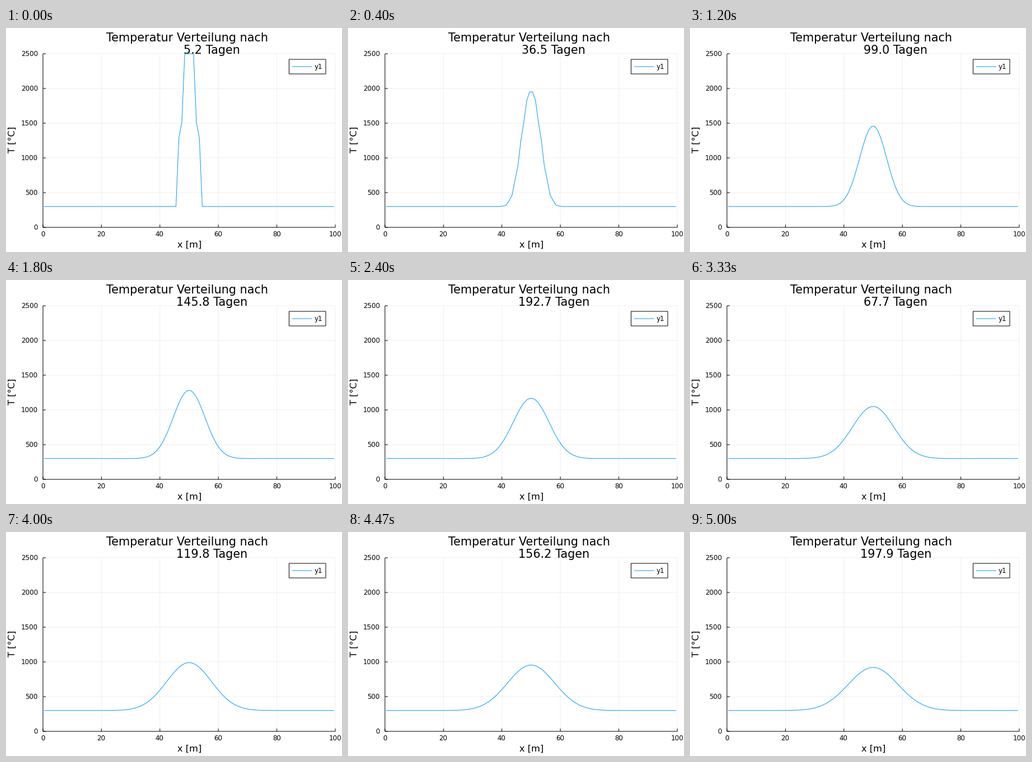
Recreate the animation shown at these times as a matplotlib script. Size 600 by 400 pixels, loop 5.07 s.

```python
import numpy as np
import matplotlib.pyplot as plt
from matplotlib.animation import FuncAnimation
from matplotlib.patches import Rectangle

W, H, DPI = 600, 400, 100
LEFT, RIGHT, TOP, BOTTOM = 66, 588, 46, 356
PX = 72 / DPI                # one pixel in points
EM = 1.4815 * PX             # text scale
BLUE = "#009afa"
TITLE, GUIDE, SMALL = 14, 11, 8

STEPS, FPS = 76, 15          # simulation steps shown, steps per second
LOOP_MS, TICK_MS = 5070, 30  # the tick divides the loop exactly
RUN = 38                     # the day counter restarts after one run
DT = 450_000                 # seconds per step
ALPHA = 1e-6                 # thermal diffusivity, m^2/s
DX = 1.0

plt.rcParams["font.family"] = "DejaVu Sans"
plt.rcParams["path.snap"] = False


def simulate(steps):
    """Explicit heat diffusion of a hot layer in a 100 m column."""
    x = np.arange(0.5, 100, DX)
    temp = np.where(abs(x - 50) < 3, 2500.0, 300.0)
    r = ALPHA * DT / DX**2
    states = []
    for _ in range(steps):
        temp = temp.copy()
        temp[1:-1] += r * np.diff(temp, 2)
        states.append(temp)
    return x, states


x, states = simulate(STEPS)

fig = plt.figure(figsize=(W / DPI, H / DPI), dpi=DPI, facecolor="white")

# Pixel canvas for everything but the curve
stage = fig.add_axes([0, 0, 1, 1])
stage.set(xlim=(0, W), ylim=(H, 0))
stage.axis("off")


def label(px, py, text, size, ha="center", **kw):
    return stage.text(px, py, text, fontsize=size * EM, ha=ha,
                      va="baseline", color="black", **kw)


def to_px(v, top_value, start, end):
    return start + v / top_value * (end - start)


grid = dict(color="black", alpha=0.06, lw=PX)
axis = dict(color="black", lw=PX)

for v in range(0, 101, 20):
    px = to_px(v, 100, LEFT, RIGHT)
    stage.vlines(px, TOP, BOTTOM, **grid)
    stage.vlines(px, BOTTOM - 5, BOTTOM, **axis)
    label(px - 0.4, 372, str(v), SMALL)
for v in range(0, 2501, 500):
    py = to_px(v, 2500, BOTTOM, TOP)
    stage.hlines(py, LEFT, RIGHT, **grid)
    stage.hlines(py, LEFT, LEFT + 5, **axis)
    label(56.8, py + 4.2, str(v), SMALL, ha="right")
stage.vlines(LEFT, TOP, BOTTOM, **axis)
stage.hlines(BOTTOM, LEFT, RIGHT, **axis)

label(327.5, 392, "x [m]", GUIDE)
label(16, 199.5, "T [°C]", GUIDE, rotation=90, rotation_mode="anchor")
label(323.2, 24, "Temperatur Verteilung nach", TITLE)
days = label(367.3, 46, "", TITLE)

stage.add_patch(Rectangle((505.5, 56), 65.5, 26, fc="white", ec="black",
                          lw=PX))
stage.hlines(69, 511, 546.5, color=BLUE, lw=PX)
label(551, 73.5, "y1", SMALL, ha="left")

ax = fig.add_axes([LEFT / W, 1 - BOTTOM / H,
                   (RIGHT - LEFT) / W, (BOTTOM - TOP) / H])
ax.set(xlim=(0, 100), ylim=(0, 2500))
ax.axis("off")
curve, = ax.plot([], [], color=BLUE, lw=PX, clip_on=False)


def update(tick):
    # a step begins in the tick that holds its start time
    i = min((tick * TICK_MS + 20) * FPS // 1000, STEPS - 1)
    curve.set_data(x, states[i])
    days.set_text(f"{(i % RUN + 1) * DT / 86400:.1f} Tagen")
    return curve, days


anim = FuncAnimation(fig, update, frames=LOOP_MS // TICK_MS,
                     interval=TICK_MS, repeat=True, repeat_delay=0)
plt.show()
```
